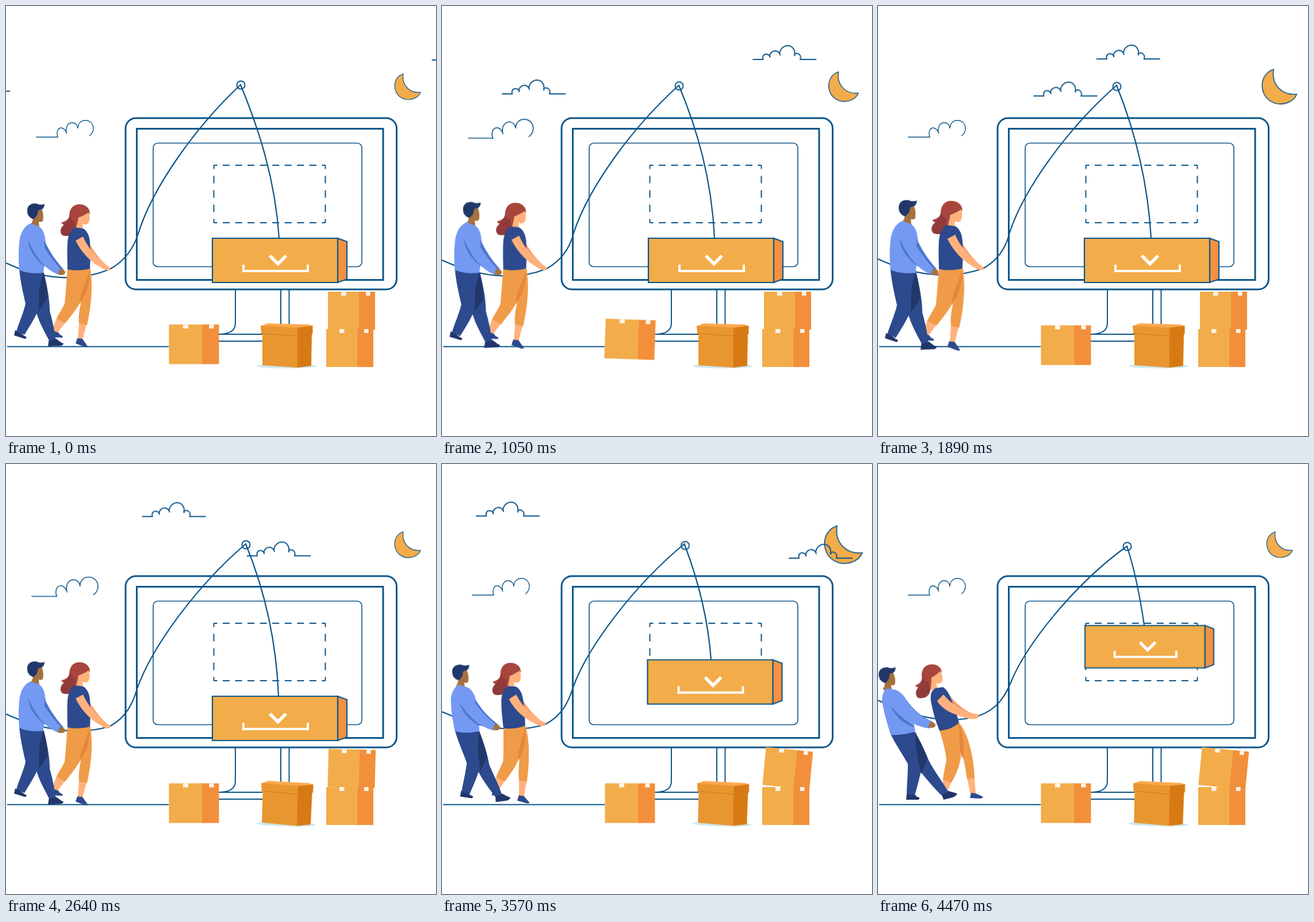
These frames come from a looping animation (748 px wide and 748 px high, 4.5 s). An HTML page without scripts:

```html
<!DOCTYPE html>
<html lang="en">
<head>
<meta charset="utf-8">
<title>Lifting a package</title>
<style>
html, body { margin: 0; width: 100%; height: 100%; overflow: hidden; background: #fff; }
svg { display: block; width: 100%; height: 100%; }

.line { fill: none; stroke: #0d568a; stroke-width: 2; }
.light { fill: #f2ac4a; } .amber { fill: #f28f3b; } .tab { fill: #fff4e8; }
.front { fill: #e8962f; } .side { fill: #d87a14; }
.navy { fill: #2c4a8d; } .ink { fill: #21376a; }
.shirt { fill: #7399f2; } .fold { fill: #4a75cd; }
.brown { fill: #a5713f; } .skin { fill: #ffb17d; } .tan { fill: #f59e6a; }
.hair { fill: #a8453d; } .lock { fill: #903a3b; }
.pants { fill: #f09b48; } .crease { fill: #e5873a; }

.anim, .anim path { animation: 4.5s linear infinite; }
.drift-left { animation-name: drift-left; }
.drift-right { animation-name: drift-right; }
.puff { animation-name: puff; transform-origin: 101.5px 213.5px; animation-timing-function: ease-in-out; }
.moon { animation-name: glow; transform-origin: 699.5px 140.5px; animation-timing-function: ease-in-out; }
.ring { animation-name: ring; }
.rope { animation-name: rope; }
.package { animation-name: lift; transform-origin: 359px 404px; }
.hop { animation-name: hop; transform-origin: 327px 590px; animation-timing-function: ease-in-out; }
.nudge { animation-name: nudge; transform-origin: 488px 592px; animation-timing-function: ease-in-out; }
.tip { animation-name: tip; transform-origin: 641px 563px; animation-timing-function: ease-in-out; }

.person { animation-name: breathe; animation-timing-function: ease-in-out; }
.man { transform-origin: 55px 468px; --pull: cubic-bezier(.25, .5, .5, 1); }
.woman { transform-origin: 130px 468px; }
.person path { animation: none; }
.pose path { d: var(--a); animation: 4.5s infinite; }
.man .pose path { animation-name: man-pull; }
.woman .pose path { animation-name: woman-pull; }
.man .head { animation-name: man-head; transform-origin: 52px 366px; }
.man .hand { animation-name: man-hand; }
.woman .head { animation-name: woman-head; transform-origin: 125px 370px; }

@keyframes drift-left { from { transform: translate(741px, 94px); } to { transform: translate(-118.5px, 89.5px); } }
@keyframes drift-right { from { transform: translate(-104px, 148.3px); } to { transform: translate(787px, 167.7px); } }
@keyframes puff {
  0%, 4.7%, 31.3%, 41.1%, 67.8%, to { transform: none; }
  18%, 54.4% { transform: scale(1.2); }
}
@keyframes glow {
  0%, 2%, 28.7%, 33.3%, 60%, 66%, 92.7%, to { transform: none; }
  15.3%, 46.7%, 79.3% { transform: scale(1.46); }
}
@keyframes breathe {
  0%, 2%, 28.7%, 33.3%, 60%, to { transform: none; }
  15.3%, 46.7% { transform: scale(1.065); }
}
@keyframes ring {
  23.33% { transform: translate(4px, 1.5px); }
  42% { transform: translate(7px, 2.5px); }
  58.67% { transform: translate(9px, 3px); }
  72.67% { transform: translate(11px, 3.5px); }
  86% { transform: translate(18px, 5px); }
  99.33%, to { transform: translate(25px, 6px); }
}
@keyframes rope {
  0% { d: path("M0 447C60 475 125 482 182 457C212 440 224 415 230 396C255 315 330 210 408 137C440 215 468 300 475 403"); }
  23.33% { d: path("M0 442C60 470 125 480 182 457C212 440 224 415 229 395C255 315 332 210 412 138C444 215 469 300 474 403"); }
  42% { d: path("M0 440C60 468 125 478 184 456C212 440 224 415 229 394C255 315 333 210 415 138C446 215 469 300 475 403"); }
  58.67% { d: path("M0 435C60 462 125 474 181 456C211 440 222 412 228 391C255 315 334 210 417 139C448 215 470 300 474 403"); }
  69% { d: path("M0 433C60 460 125 473 181 456C211 440 222 412 228 390C255 315 335 210 419 139C448 215 470 300 474 403"); }
  72.67% { d: path("M0 433C60 459 125 473 181 456C211 440 222 412 228 389C255 315 335 210 420 139C449 213 470 293 474 389"); }
  86% { d: path("M0 429C60 455 122 470 179 449C210 434 221 408 229 385C255 316 336 210 423 139C440 185 455 240 462 291"); }
  99.33%, to { d: path("M0 411C60 439 120 455 175 438C208 427 222 402 231 380C255 318 340 210 433 143C447 185 456 232 463 280"); }
}
@keyframes lift {
  0%, 69% { transform: none; }
  72.67% { transform: translate(-.6px, -14.5px); }
  86% { transform: translate(-2.5px, -112px); }
  99.33%, to { transform: translate(1px, -123px) scale(.957); }
}
@keyframes hop {
  0% { transform: translateY(-1.5px); }
  20% { transform: translateY(-11.5px) rotate(2.2deg); }
  34%, to { transform: none; }
}
@keyframes nudge {
  0%, 37% { transform: none; }
  56% { transform: rotate(1.7deg); }
  71%, to { transform: rotate(1.2deg); }
}
@keyframes tip {
  0%, 49% { transform: none; }
  58.67% { transform: translate(-.5px, .5px) rotate(1.4deg); }
  72%, to { transform: translate(-3px, 3px) rotate(5.5deg); }
}
@keyframes man-pull {
  0%, 71% { d: var(--a); animation-timing-function: var(--pull); }
  99.33%, to { d: var(--b); }
}
@keyframes man-head {
  0%, 71% { transform: none; animation-timing-function: cubic-bezier(.25, .5, .5, 1); }
  99.33%, to { transform: translate(-35px, 10px) rotate(-4deg); }
}
@keyframes man-hand {
  0%, 71% { transform: none; animation-timing-function: cubic-bezier(.25, .5, .5, 1); }
  99.33%, to { transform: translate(-3px, -9px); }
}
@keyframes woman-pull {
  0%, 72.67% { d: var(--a); animation-timing-function: linear; }
  99.33%, to { d: var(--b); }
}
@keyframes woman-head {
  0%, 72.67% { transform: none; }
  99.33%, to { transform: translate(-33px, 4px) rotate(-10deg); }
}
</style>
</head>
<body>
<svg viewBox="0 0 748 748">
  <defs>
    <path id="cloud" d="M0 0H18C16-8 22-10 25-9C29-8 31-6 30-3M29-5C31-13 36-15 40-15C45-14 48-10 48-7M47-9C47-19 55-24 61-24C69-24 75-17 73-6M72-8C77-14 86-8 83 0H111"/>
    <g id="carton">
      <path class="light" d="M0 0H57V69H0Z"/>
      <path class="amber" d="M57 0H87V69H57Z"/>
      <path class="tab" d="M24.500 0h9v7h-9zM70 0h8v7h-8z"/>
    </g>
  </defs>

  <g class="anim moon">
    <path fill="#f2ac4a" stroke="#0d568a" stroke-width="1.2" d="M691 118C672 124 672 150 687 159C700 167 717 161 721 150C702 152 688 138 691 118Z"/>
  </g>
  <use href="#cloud" class="line anim drift-left"/>
  <use href="#cloud" class="line anim drift-right"/>
  <g class="anim puff">
    <path class="line" stroke-width="1.4" style="stroke-width:1.4" d="M52 228H90C87 220 90 212 96 212C102 212 104 218 106 222M105 220C103 208 110 203 115 203C121 203 125 208 125 213C125 204 131 199 138 199C147 199 152 206 152 213C152 219 149 223 145 226"/>
  </g>

  <path class="line" d="M2 592.500H283M399 494V552C399 565 389 570 374 571M370 571H446M370 583H447M478 494V553M492.500 494V553"/>
  <g class="line">
    <rect x="208" y="195" width="471.500" height="298" rx="18" stroke-width="3"/>
    <rect x="227.500" y="213.500" width="428.500" height="263" stroke-width="3"/>
    <rect x="256" y="238.500" width="363" height="215" rx="8" stroke-width="1.600"/>
    <path stroke-dasharray="12 9.556" stroke-dashoffset="6" d="M361.500 277H555.500M361.500 377H555.500"/>
    <path stroke-dasharray="13 12" stroke-dashoffset="6.500" d="M361.500 277V377M555.500 277V377"/>
  </g>

  <g class="anim hop"><use href="#carton" x="283.500" y="555.500"/></g>
  <g class="anim nudge">
    <ellipse cx="488" cy="626.500" rx="52" ry="3.800" fill="#cfe7ee"/>
    <path class="front" d="M446 568L507 573V629L446 625Z"/>
    <path class="side" d="M507 573L532 569L531 626L507 629Z"/>
    <path fill="#fcaa50" d="M443 557L455 552L526 554L533 556L507 560Z"/>
    <path class="front" d="M443 556L507 559.500V574L444 570Z"/>
    <path class="side" d="M507 559.500L533.500 556V570L507 574Z"/>
    <path fill="none" stroke="#cf7a1a" d="M444 570L507 574L533 570"/>
  </g>
  <g class="anim tip"><use href="#carton" transform="translate(560 497) scale(.943 .957)"/></g>
  <use href="#carton" transform="translate(557 562) scale(.943 .957)"/>

  <g class="anim package">
    <g stroke="#0d568a" stroke-width="2.200">
      <path fill="#f49140" d="M577 404L593 410V475L577 481Z"/>
      <path class="light" d="M359 404H577V481H359Z"/>
    </g>
    <path fill="none" stroke="#fff" stroke-width="5.500" d="M459 434.500L473 448.500L487 434.500"/>
    <path fill="none" stroke="#fff" stroke-width="4" d="M413 450V461H525V450"/>
  </g>
  <path class="line anim rope" style="stroke-width:2.200"/>
  <circle class="line anim ring" cx="408.500" cy="137.500" r="7"/>

  <g class="anim person woman">
    <g class="pose">
      <path class="navy" style="--a:path('M84 562L78 576L98 577C100 576 98 573 94 572L89 565Z');--b:path('M112 566L111 577L130 580C133 579 132 577 128 576L121 567Z')"/>
      <path class="skin" style="--a:path('M88 543L103 551L90 568L80 564Z');--b:path('M113 548L128 553L121 569L112 568Z')"/>
      <path class="skin" style="--a:path('M127 551L140 554L133 581L125 580Z');--b:path('M155 547L168 545L170 575L161 575Z')"/>
      <path class="navy" style="--a:path('M124 578L121 587L137 593C141 594 143 593 142 592L133 579Z');--b:path('M162 572L160 581L178 582C183 581 184 579 181 578L170 573Z')"/>
      <path class="pants" style="--a:path('M107 457C105 480 104 500 102 518C96 530 90 538 88 544L103 552C114 538 124 526 130 514L146 458Z');--b:path('M107 463C112 480 118 500 119 515C116 530 114 540 113 549L128 554C136 540 142 525 144 510L141 450Z')"/>
      <path class="pants" style="--a:path('M118 460C122 480 128 505 130 518C127 530 126 542 127 552L141 555C144 540 147 525 148 510C150 490 149 475 147 457Z');--b:path('M120 462C132 480 144 500 148 512C152 525 153 537 155 548L168 546C167 525 164 505 160 492C156 475 150 462 141 450Z')"/>
      <path class="crease" style="--a:path('M146 459L131 500L128 515C138 505 145 490 146 459Z');--b:path('M141 452L142 495L146 512C151 500 150 475 141 452Z')"/>
      <path class="tan" style="--a:path('M139 402C148 420 160 438 174 450L165 453L142 420Z');--b:path('M123 400C134 416 150 428 167 436L160 438L128 418Z')"/>
    </g>
    <g class="anim head">
      <path class="hair" d="M146 361C146 350 136 344 126 345C114 346 110 356 110 366C108 374 100 375 96 377C98 380 100 380 101 381C95 385 94 392 96 396C98 394 98 396 97 398C104 402 114 400 118 394C122 388 124 382 128 376L138 366Z"/>
      <path class="lock" d="M111 362C110 372 103 376 101 381C95 385 94 392 96 396L97 398C104 402 114 400 118 394C122 387 120 380 119 374C114 372 112 368 111 362Z"/>
      <path class="skin" d="M126 368C132 366 138 363 144 359C147 368 145 376 143 378C140 381 136 380 133 379L134 391L121 388C124 380 125 374 126 368Z"/>
    </g>
    <g class="pose">
      <path class="navy" style="--a:path('M120 385C112 390 108 398 107 412C106 430 107 445 107 458C118 461 134 460 146 457C147 440 147 425 146 410C145 398 140 390 134 387Z');--b:path('M100 390C92 394 91 402 92 412C95 430 100 447 107 464C118 463 130 460 141 450C137 435 132 420 126 406C122 396 118 391 113 388Z')"/>
      <path class="skin" style="--a:path('M121 408L134 401C142 420 158 440 181 455L181 459C176 461 171 459 167 456C148 446 132 430 121 408Z');--b:path('M103 412L114 401C126 416 145 430 175 436L175 441C168 445 160 444 154 442C132 436 112 428 103 412Z')"/>
    </g>
  </g>

  <g class="anim person man">
    <g class="pose">
      <path class="ink" style="--a:path('M16 564L14 573L33 579C37 578 36 575 32 574L23 567Z');--b:path('M50 573L49 584L70 584C74 582 72 579 68 579L63 574Z')"/>
      <path class="ink" style="--a:path('M75 579L73 592L96 591C101 589 101 586 97 586L86 578Z');--b:path('M110 573L114 584L130 580C139 576 139 573 134 572L123 569Z')"/>
      <path class="navy" style="--a:path('M23 457C25 480 30 500 34 518C30 535 22 552 18 566L32 572C42 556 52 540 56 528L62 466Z');--b:path('M22 470C32 490 46 510 52 522C52 542 50 560 50 575L64 576C70 555 74 540 76 525L64 466Z')"/>
      <path class="navy" style="--a:path('M30 460C36 490 48 520 58 548C64 562 70 572 75 582L86 580C84 560 80 545 76 530C76 510 72 490 66 464Z');--b:path('M30 472C44 495 62 520 78 540C90 555 100 566 110 576L122 570C112 552 98 535 88 515C82 500 74 482 64 466Z')"/>
      <path class="ink" style="--a:path('M58 490L65 464C70 480 72 495 72 508C66 518 62 524 57 530Z');--b:path('M66 492L65 466C72 482 80 498 86 512C82 522 78 530 75 540Z')"/>
    </g>
    <g class="anim head">
      <path class="brown" d="M52 360C55 356 60 354 62 353C66 362 65 370 64 374C62 376 60 376 57 375L58 386L42 382C46 376 47 372 47 368Z"/>
      <path class="ink" d="M37 357C36 347 45 342 54 344C58 346 64 346 67 344C67 350 64 354 61 354L56 356L54 364L48 371C40 368 37 363 37 357Z"/>
    </g>
    <g class="pose">
      <path class="shirt" style="--a:path('M43 378C34 382 27 390 24 405C21 425 22 445 23 459C36 465 52 466 65 464C67 450 68 430 69 413C68 396 64 388 58 384Z');--b:path('M16 390C9 394 7 403 7 412C10 432 16 452 22 471C36 472 52 470 65 465C62 450 58 432 50 412C46 402 38 396 31 393Z')"/>
      <path class="fold" style="--a:path('M67 408C74 424 84 440 100 458L97 462C82 452 72 440 66 428Z');--b:path('M49 410C60 426 76 440 96 449L92 453C74 446 60 434 50 422Z')"/>
      <path class="fold" style="--a:path('M38 407C41 425 49 438 66 452L72 455C58 438 48 426 38 407Z');--b:path('M21 420C30 438 42 450 60 457L64 456C46 446 34 434 21 420Z')"/>
      <path class="shirt" style="--a:path('M52 395C60 410 74 436 96 458L91 467C76 462 55 446 39 408Z');--b:path('M40 400C50 416 68 436 93 449L90 460C68 458 42 444 21 420Z')"/>
    </g>
    <path class="brown anim hand" style="animation:man-hand 4.5s linear infinite" d="M93 458C98 457 103 460 103 464C102 468 97 469 90 467Z"/>
  </g>
</svg>
</body>
</html>
```
